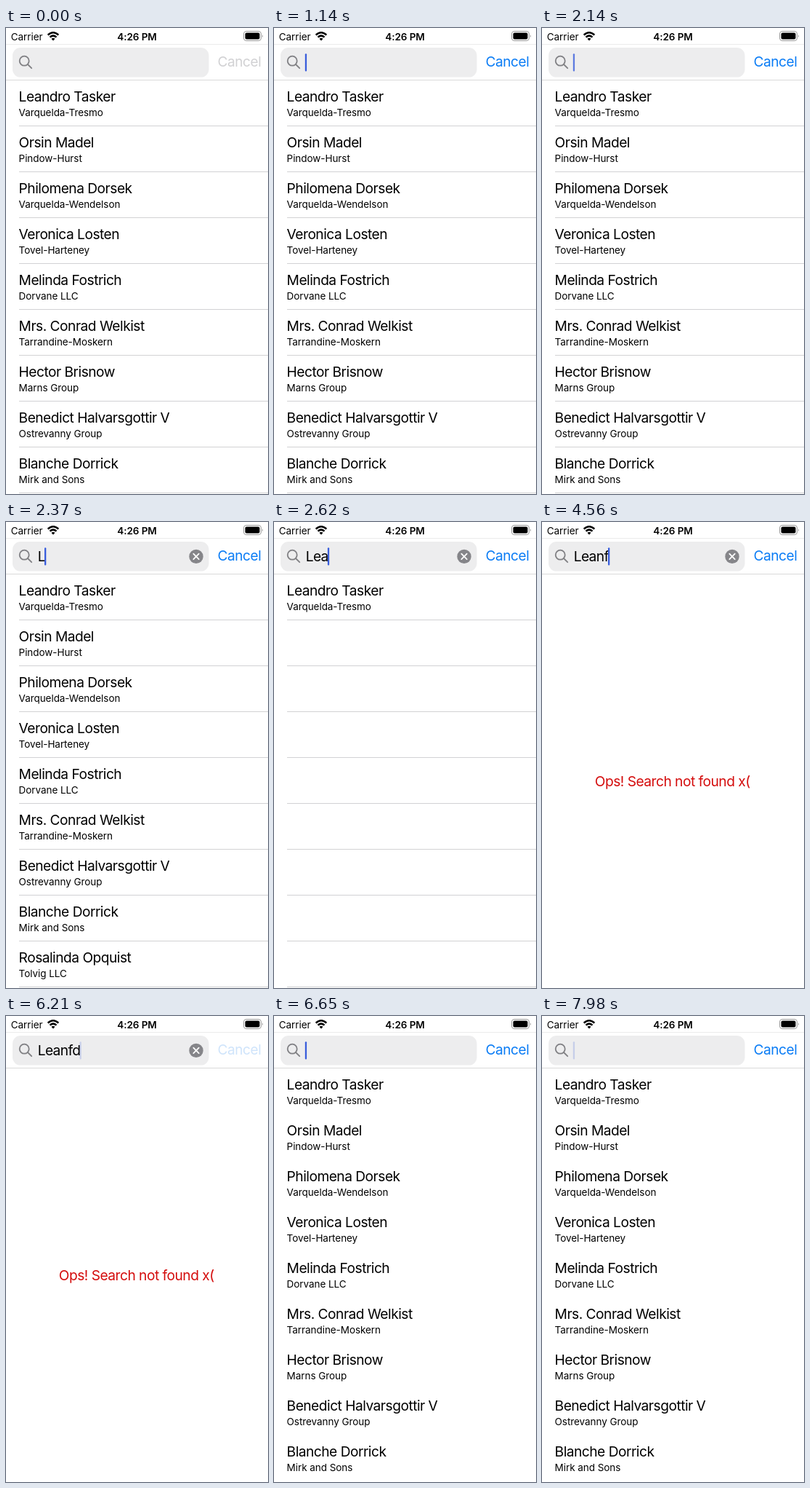
Recreate the animation shown at these times as an HTML page. Size 361 by 640 pixels, loop 8000 ms.

```html
<!DOCTYPE html>
<html lang="en">
<head>
<meta charset="utf-8">
<title>Contact search</title>
<style>
  html, body { margin: 0; width: 100%; height: 100%; overflow: hidden; background: #fff; }
  svg { display: block; width: 100%; height: 100%; }
  text { font-family: Inter, Roboto, sans-serif; fill: #000; white-space: pre; }
  .body { font-size: 19.2px; letter-spacing: -0.52px; }
  .query { font-size: 19.2px; letter-spacing: -0.65px; }
  .small { font-size: 13.5px; letter-spacing: -0.06px; }
</style>
</head>
<body>
<svg id="stage" viewBox="0 0 361 640">
  <rect width="361" height="640" fill="#fff"/>

  <text class="small" x="6.8" y="16.5">Carrier</text>
  <g transform="translate(.5 0)">
    <g fill="none" stroke="#000" stroke-width="2.5">
      <path d="M57.2 9.6Q64.5 2.9 71.8 9.6"/>
      <path d="M60 12.7Q64.5 8.6 69 12.7"/>
    </g>
    <path d="M64.5 17.4L62 14.7Q64.5 12.6 67 14.7Z"/>
  </g>
  <text class="small" x="180.5" y="16.5" font-weight="600" text-anchor="middle">4:26 PM</text>
  <rect x="327.5" y="4.5" width="24" height="13" rx="3.6" fill="#fff" stroke="#999"/>
  <rect x="329.5" y="6.5" width="20" height="9" rx="2" fill="#000"/>
  <path d="M353 9.2Q355 11.1 353 13Z" fill="#999"/>
  <path d="M0 22.5H361" stroke="#ececec"/>

  <rect x="9" y="27" width="270.5" height="40.6" rx="11" fill="#ededee"/>
  <g fill="none" stroke="#808084" stroke-width="1.8" stroke-linecap="round">
    <circle cx="25.2" cy="45.2" r="6.5"/>
    <path d="M30 50L35.2 55.2"/>
  </g>
  <text id="query" class="query" x="43.7" y="54"></text>
  <rect id="caret" y="35.2" width="2.3" height="24.2" rx="1" fill="#3a5edc"/>
  <g id="clear">
    <circle cx="262" cy="47.4" r="9.7" fill="#858589"/>
    <path d="M258.3 43.7L265.7 51.1M265.7 43.7L258.3 51.1" stroke="#fff" stroke-width="1.8" stroke-linecap="round"/>
  </g>
  <text id="cancel" class="body" x="291.5" y="53.3">Cancel</text>
  <path d="M0 71.5H361" stroke="#dadada"/>

  <g id="lines" stroke="#d2d2d4"></g>
  <g id="rows"></g>
  <text id="missing" class="body" x="72.8" y="363" style="fill:#d40c0c">Ops! Search not found x(</text>
</svg>
<script>
const LOOP = 8000, ROW = 63, VISIBLE = 9;
const BLUE = '#0a7cf5';

const people = [
  ['Leandro Tasker', 'Varquelda-Tresmo'],
  ['Orsin Madel', 'Pindow-Hurst'],
  ['Philomena Dorsek', 'Varquelda-Wendelson'],
  ['Veronica Losten', 'Tovel-Harteney'],
  ['Melinda Fostrich', 'Dorvane LLC'],
  ['Mrs. Conrad Welkist', 'Tarrandine-Moskern'],
  ['Hector Brisnow', 'Marns Group'],
  ['Benedict Halvarsgottir V', 'Ostrevanny Group'],
  ['Blanche Dorrick', 'Mirk and Sons'],
  ['Rosalinda Opquist', 'Tolvig LLC']
];

// Each track lists [start in ms, value]; values hold until the next entry.
const typed = [[0, ''], [2370, 'L'], [2620, 'Lea'], [3600, 'Lean'],
  [4460, 'Leanf'], [5070, 'Leanfd'], [6320, '']];

const blink = [[0, 0], [1020, .5], [1140, 1], [1660, .35], [1780, 0],
  [2020, .4], [2140, .8], [2370, 1], [3250, 0], [3490, .5], [3600, 1],
  [4220, 0], [4460, 1], [5070, .4], [5190, 0], [5430, .5], [5550, 1],
  [6090, .6], [6210, .2], [6320, 0], [6430, .5], [6540, 1], [6870, .4],
  [6990, 0], [7320, 1], [7860, .6], [7980, .22]];

const cancelColor = [[0, '#d1d1d3'], [1020, '#86bbf2'], [1140, BLUE],
  [6090, '#8cc0f8'], [6210, '#cfe4fb'], [6430, '#8cc0f8'],
  [6540, '#3f97f6'], [6650, BLUE]];

const LINES_END = 4460;

const at = (track, t) => track.findLast(([start]) => start <= t)[1];
const $ = id => document.getElementById(id);
const show = (node, on) => node.setAttribute('visibility', on ? 'visible' : 'hidden');

function add(parent, tag, attrs) {
  const node = document.createElementNS('http://www.w3.org/2000/svg', tag);
  for (const key in attrs) node.setAttribute(key, attrs[key]);
  return parent.appendChild(node);
}

const [query, caret, clear, cancel, lines, missing] =
  ['query', 'caret', 'clear', 'cancel', 'lines', 'missing'].map($);

const rows = Array.from({ length: VISIBLE }, (_, i) => {
  const y = i * ROW;
  add(lines, 'path', { d: `M18 ${134.5 + y}H361` });
  return [
    add($('rows'), 'text', { class: 'body', x: 17.6, y: 100.6 + y }),
    add($('rows'), 'text', { class: 'small', x: 17.6, y: 120.7 + y })
  ];
});

let current = null;

function search(text) {
  if (text === current) return;
  current = text;
  const found = people.filter(([name]) => name.toLowerCase().includes(text.toLowerCase()));
  rows.forEach((row, i) => row.forEach((node, k) => {
    node.textContent = found[i] ? found[i][k] : '';
  }));
  query.textContent = text;
  caret.setAttribute('x', 42.8 + (text ? query.getComputedTextLength() : 0));
  show(clear, text);
  show(missing, !found.length);
}

function draw(t) {
  search(at(typed, t));
  caret.setAttribute('opacity', at(blink, t));
  cancel.style.fill = at(cancelColor, t);
  show(lines, t < LINES_END);
}

const start = performance.now();
function tick() {
  draw((performance.now() - start) % LOOP);
  requestAnimationFrame(tick);
}
tick();
</script>
</body>
</html>
```
